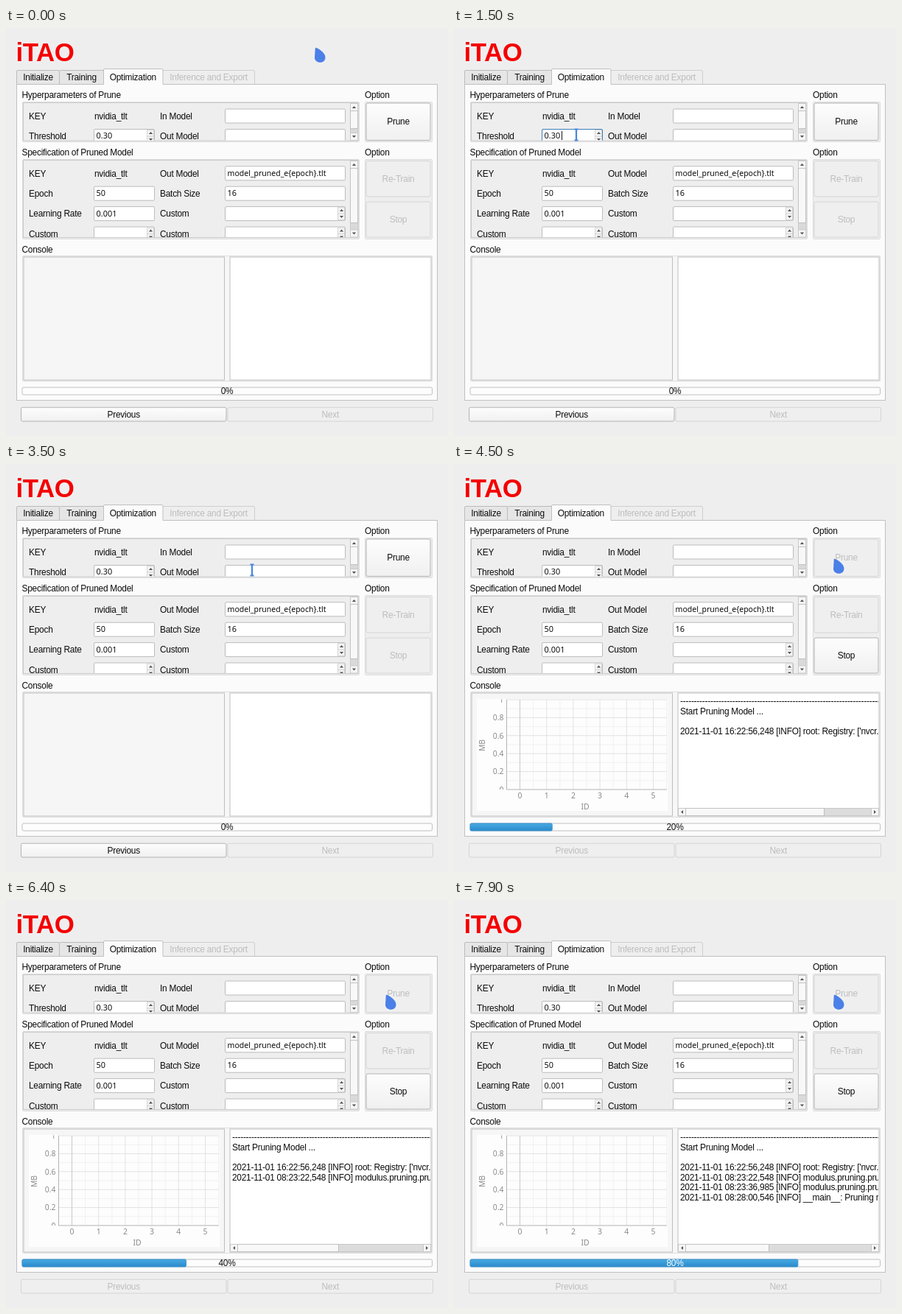
Recreate the animation shown at these times as an HTML page. Size 600 by 554 pixels, loop 8000 ms.

```html
<!DOCTYPE html>
<html lang="en">
<head>
<meta charset="utf-8">
<title>Optimization panel</title>
<style>
html, body { margin: 0; width: 100%; height: 100%; overflow: hidden; background: #efeeef; }
svg { display: block; width: 600px; height: 554px; }
text { font: 11.9px "Liberation Sans", Arial, sans-serif; letter-spacing: -.24px; fill: #0c0c0c; white-space: pre; }
.edit { font-family: "Noto Sans", sans-serif; font-size: 10.9px; font-weight: 500; letter-spacing: 0; }
.axis { font-family: "Noto Sans", sans-serif; font-size: 10.4px; letter-spacing: 0; fill: #8a8a8a; }
.mid { text-anchor: middle; }
.end { text-anchor: end; }
.off { fill: #bdbdbd; }
.title { font-size: 34.8px; font-weight: bold; letter-spacing: -.4px; fill: #f40000; }
</style>
</head>
<body>
<svg id="stage" viewBox="0 0 600 554" xmlns="http://www.w3.org/2000/svg"></svg>
<script>
const LOOP = 8000, STEP = 100;
const stage = document.getElementById('stage');

const text = (x, y, s, cls = '', extra = '') =>
  `<text x="${x}" y="${y}" class="${cls}" ${extra}>${s}</text>`;
// Box given by its outer edges, with a one pixel border.
const box = (x0, y0, x1, y1, fill, line, r = 0, extra = '') =>
  `<rect x="${x0 + .5}" y="${y0 + .5}" width="${x1 - x0 - 1}" height="${y1 - y0 - 1}" rx="${r}" fill="${fill}" stroke="${line}" ${extra}/>`;
const path = (d, fill, line = 'none', extra = '') =>
  `<path d="${d}" fill="${fill}" stroke="${line}" ${extra}/>`;
const group = (id, body, extra = '') => `<g id="${id}" ${extra}>${body}</g>`;
const clip = (id, x, y, w, h) =>
  `<clipPath id="${id}"><rect x="${x}" y="${y}" width="${w}" height="${h}"/></clipPath>`;

const arrow = (x, y, dir, c = '#555') => {
  const turn = { up: 0, right: 90, down: 180, left: 270 }[dir];
  return path('M-2.6 1.5L0-1.5L2.6 1.5Z', c, 'none', `transform="translate(${x} ${y}) rotate(${turn})"`);
};

const field = (x0, y0, x1, s = '', size = 0) =>
  box(x0, y0, x1, y0 + 20, '#fff', '#bcbcbc', 1.5) +
  text(x0 + 3.6, y0 + 13.4, s, 'edit', size ? `style="font-size:${size}px"` : '');

const spin = (x0, y0, x1, s) =>
  field(x0, y0, x1, s) +
  box(x1 - 11, y0 + 1, x1 - 1, y0 + 19, '#f4f4f4', '#d6d6d6') +
  path(`M${x1 - 11} ${y0 + 10}h10`, 'none', '#d0d0d0') +
  arrow(x1 - 5.5, y0 + 5.5, 'up') + arrow(x1 - 5.5, y0 + 14.5, 'down');

const vbar = (y0, y1, thumb) =>
  box(467, y0, 478, y1, '#d9d9d9', '#cacaca') +
  box(467, y0, 478, y0 + 11, '#f6f6f6', '#cacaca') +
  box(467, y1 - 11, 478, y1, '#f6f6f6', '#cacaca') +
  box(467, y0 + 10, 478, thumb, '#f8f8f8', '#c2c2c2') +
  arrow(472.5, y0 + 5.5, 'up') + arrow(472.5, y1 - 5.5, 'down');

const button = (x0, y0, x1, y1, label, on) =>
  box(x0, y0, x1, y1, on ? 'url(#btn)' : '#f0eff0', on ? '#b2b2b2' : '#d4d4d4', 2) +
  text((x0 + x1) / 2, (y0 + y1) / 2 + 4, label, on ? 'mid' : 'mid off');

const frame = (x0, y0, x1, y1, fill = '#efeeef') => box(x0, y0, x1, y1, fill, '#dcdcdc', 1.5);
const inset = (y0, y1) => box(23, y0, 478.5, y1, 'none', '#cbcbcb');

function tabs() {
  const tab = (x0, x1, s, cls = '') =>
    box(x0, 57, x1, 78, cls ? '#eeeeee' : '#e6e6e6', cls ? '#cfcfcf' : '#bcbcbc', 1.5) +
    text((x0 + x1) / 2, 71.2, s, 'mid ' + cls);
  return tab(14, 73, 'Initialize') + tab(72, 133, 'Training') +
    tab(212, 338, 'Inference and Export', 'off') +
    box(14, 76, 586, 506, '#fcfbfc', '#c0c0c0') +
    path('M132.5 77V57q0-1.5 1.5-1.5H211.5q1.5 0 1.5 1.5V77', '#fcfbfc', '#c0c0c0') +
    path('M133 75.5h79.5v3H133z', '#fcfbfc') +
    text(172.3, 70.6, 'Optimization', 'mid');
}

function forms() {
  const prune =
    text(31, 124.2, 'KEY') + text(120, 124.2, 'nvidia_tlt') + text(209, 124.2, 'In Model') +
    field(297, 109.5, 461) +
    text(31, 151.4, 'Threshold') + spin(119, 137, 202, '0.30') +
    text(209, 151.4, 'Out Model') + field(297, 137, 461) +
    group('focus', box(119, 137, 202, 157, 'none', '#3d7fb5', 1.5) + path('M146.5 140v12', 'none', '#111')) +
    group('caret', path('M301.5 140v12', 'none', '#111'));
  const spec =
    text(31, 201.6, 'KEY') + text(120, 201.6, 'nvidia_tlt') + text(209, 201.6, 'Out Model') +
    field(297, 187.3, 461, 'model_pruned_e{epoch}.tlt', 10.5) +
    text(31, 228.9, 'Epoch') + field(119, 214.7, 202, '50') +
    text(209, 228.9, 'Batch Size') + field(297, 214.7, 461, '16') +
    text(31, 256.2, 'Learning Rate') + field(119, 242.1, 202, '0.001') +
    text(209, 256.2, 'Custom') + spin(297, 242.1, 461, '') +
    text(31, 283.8, 'Custom') + spin(119, 269.5, 202, '') +
    text(209, 283.8, 'Custom') + spin(297, 269.5, 461, '');
  return text(21.5, 95.4, 'Hyperparameters of Prune') + frame(22, 100, 480, 155) + inset(101, 153.5) +
    group('prune', prune, 'clip-path="url(#c1)"') + vbar(102, 153, 137) +
    text(21.5, 173.4, 'Specification of Pruned Model') + frame(22, 178, 480, 287) + inset(179, 285) +
    group('spec', spec, 'clip-path="url(#c2)"') + vbar(180, 284.5, 265) +
    text(487, 95.4, 'Option') + frame(487, 100, 579, 155) +
    text(487, 173.4, 'Option') + frame(487, 178, 579, 287) +
    button(488.5, 180, 576.5, 229.5, 'Re-Train', false);
}

function chart() {
  let s = '<rect x="31" y="319" width="259" height="152" fill="#fdfdfd"/>';
  const x = i => 89.5 + 36.2 * i, y = i => 442 - 24.4 * i;
  let fine = '', grid = '';
  for (let i = 0; i < 6; i++) {
    grid += `M${x(i)} 320V442`;
    fine += `M${x(i + .5)} 320V442`;
    if (i) grid += `M71 ${y(i)}H289`;
    if (i < 5) fine += `M71 ${y(i + .5)}H289`;
    s += text(x(i), 453.6, i, 'axis mid');
  }
  s += path(fine, 'none', '#f1f1f1') + path(grid, 'none', '#e2e2e2') +
    path(`M${x(0)} 320V442`, 'none', '#c9c9c9') +
    path('M71.5 320V442H289', 'none', '#b4b4b4');
  let ticks = '';
  for (let i = 0; i < 6; i++) ticks += text(67.5, y(i) + 3.8, i % 5 ? '0.' + i * 2 : i / 5, 'axis end');
  return s + group('ticks', ticks, 'clip-path="url(#c3)"') +
    text(178, 468.8, 'ID', 'axis mid') +
    text(0, 0, 'MB', 'axis mid', 'transform="translate(41.5 382) rotate(-90)"');
}

const log = [
  '-'.repeat(80), 'Start Pruning Model ...', '',
  "2021-11-01 16:22:56,248 [INFO] root: Registry: ['nvcr.io']",
  '2021-11-01 08:23:22,548 [INFO] modulus.pruning.pruning: Exploring graph',
  '2021-11-01 08:23:36,985 [INFO] modulus.pruning.pruning: Pruning model',
  '2021-11-01 08:28:00,546 [INFO] __main__: Pruning ratio'
];

function terminal() {
  return group('log', log.map((s, i) => text(307, 326 + 13.65 * i, s, '', `id="line${i}"`)).join(''),
    'clip-path="url(#c4)"') +
    box(304, 467, 577, 478, '#dcdcdc', '#c8c8c8') +
    box(304, 467, 315, 478, '#f6f6f6', '#c8c8c8') +
    box(566, 467, 577, 478, '#f6f6f6', '#c8c8c8') +
    arrow(309.5, 472.5, 'left') + arrow(571.5, 472.5, 'right') +
    box(314, 467, 503, 478, '#f8f8f8', '#c0c0c0', 0, 'id="thumb"');
}

stage.innerHTML = `<defs>
  <linearGradient id="btn" x2="0" y2="1"><stop stop-color="#fdfdfd"/><stop offset="1" stop-color="#f0f0f0"/></linearGradient>
  <linearGradient id="fill" x2="0" y2="1"><stop stop-color="#46a9e2"/><stop offset="1" stop-color="#2b8acb"/></linearGradient>
  ${clip('c1', 24, 102, 443, 50.5)}${clip('c2', 24, 180, 443, 104)}
  ${clip('c3', 31, 319.5, 40, 122.5)}${clip('c4', 305, 312, 271, 155)}</defs>
  <rect width="600" height="554" fill="#efeeef"/>` +
  text(13.5, 45.3, 'iTAO', 'title') + tabs() + forms() +
  group('pruneOn', button(488.5, 101.5, 576.5, 153, 'Prune', true) + button(488.5, 235.5, 576.5, 284.5, 'Stop', false)) +
  group('pruneOff', button(488.5, 101.5, 576.5, 153, 'Prune', false) + button(488.5, 235.5, 576.5, 284.5, 'Stop', true)) +
  text(21.5, 305.3, 'Console') + frame(22, 309, 579, 480, '#f8f7f8') +
  box(23.5, 310.5, 297, 478.5, '#f7f6f7', '#bebebe') + box(303.5, 310.5, 577.5, 478.5, '#fff', '#bebebe') +
  group('chart', chart()) + group('term', terminal()) +
  box(21.5, 487.5, 579, 498.5, '#fdfdfd', '#c0c0c0', 2) +
  '<rect id="bar" x="22" y="488" height="10" rx="1.5" fill="url(#fill)" stroke="#3a92cd"/>' +
  text(300, 497.2, '0%', 'mid', 'id="pct"') +
  group('prevOn', button(20, 514.7, 299.5, 534.5, 'Previous', true)) +
  group('prevOff', button(20, 514.7, 299.5, 534.5, 'Previous', false)) +
  button(300.5, 514.7, 580, 534.5, 'Next', false) +
  group('drop', path('M.8 .8C3 .5 14.5 6.8 14.5 14C14.5 18.3 11.3 20.8 7.5 20.8C3.5 20.8 0 18.3 0 14.3Z', '#4a80e8')) +
  group('beam', path('M-2.5-7.5h5M0-7.5V7.5M-2.5 7.5h5', 'none', '#4a86dc', 'stroke-width="2.2"'));

const el = {};
stage.querySelectorAll('[id]').forEach(e => el[e.id] = e);
const show = (id, on) => el[id].setAttribute('display', on ? 'inline' : 'none');

// Pointer stops: time, x, y
const stops = [[0, 419, 26], [600, 184, 116], [900, 166, 145], [2000, 166, 145],
  [2300, 279, 141], [2700, 334, 144], [4000, 334, 144], [4400, 515, 128], [LOOP, 515, 128]];
const ease = k => k * k * (3 - 2 * k);

function pointer(t) {
  const i = stops.findIndex(s => s[0] > t);
  const [t0, x0, y0] = stops[i - 1], [t1, x1, y1] = stops[i];
  const k = ease((t - t0) / (t1 - t0));
  return [x0 + (x1 - x0) * k, y0 + (y1 - y0) * k];
}

const marks = [4500, 5800, 6800, 7700];
const thumbEnds = [503, 452, 428, 428];

function draw(t) {
  const [x, y] = pointer(t);
  const inField = y > 137 && y < 153 && ((x > 120 && x < 190) || (x > 297 && x < 460));
  show('beam', inField);
  show('drop', !inField);
  el[inField ? 'beam' : 'drop'].setAttribute('transform', `translate(${x} ${y})`);

  show('focus', t >= 1100 && t < 2900);
  show('caret', t >= 3700 && t < 4400);

  const n = marks.filter(m => t >= m).length, run = n > 0;
  for (const id of ['chart', 'term', 'pruneOff', 'prevOff']) show(id, run);
  for (const id of ['pruneOn', 'prevOn']) show(id, !run);
  for (let i = 4; i < log.length; i++) show('line' + i, n > i - 3);
  if (run) el.thumb.setAttribute('width', thumbEnds[n - 1] - 315);
  show('bar', run);
  el.bar.setAttribute('width', 556 * n * .2);
  el.pct.textContent = n * 20 + '%';
  el.pct.style.fill = n > 2 ? '#fff' : '#111';
}

const begin = performance.now();
function tick() {
  const t = (performance.now() - begin) % LOOP;
  draw(Math.floor(t / STEP) * STEP);
  requestAnimationFrame(tick);
}
tick();
</script>
</body>
</html>
```
